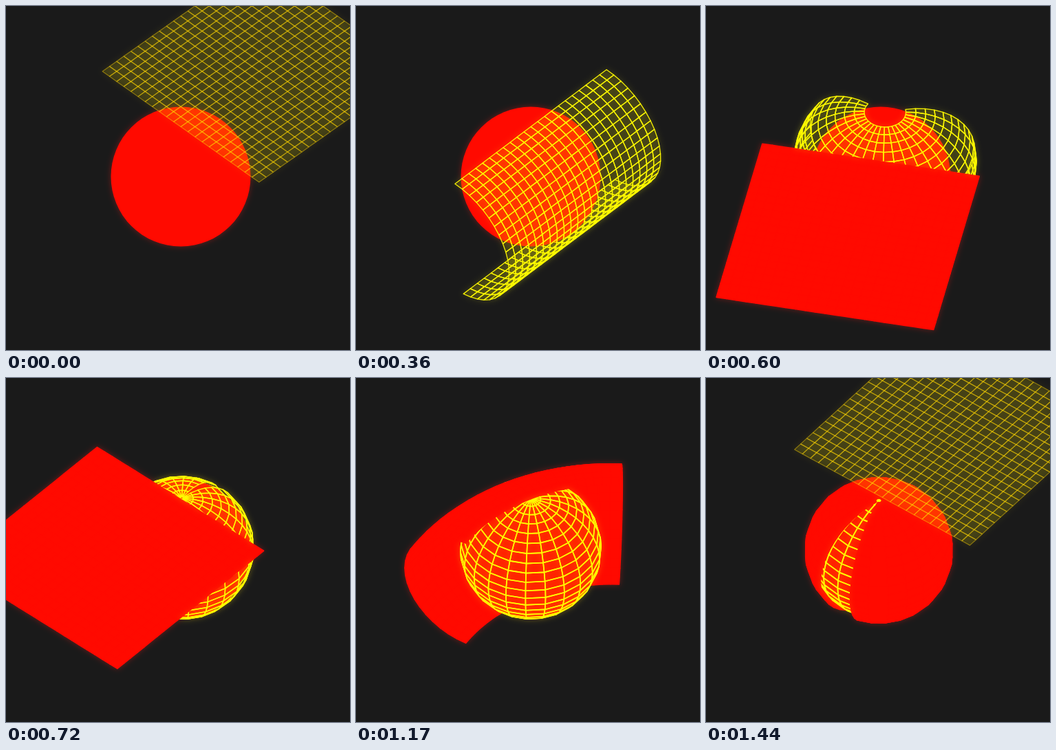
An HTML page with a canvas for the animation above (1.47 s loop, 500 by 500 pixels).

```html
<!DOCTYPE html>
<html lang="en">
<head>
<meta charset="utf-8">
<title>Wrapping sheets</title>
<style>
  html, body { margin: 0; width: 100%; height: 100%; overflow: hidden; background: #1a1a1a; }
  canvas { display: block; width: 500px; height: 500px; }
</style>
</head>
<body>
<canvas id="stage" width="500" height="500"></canvas>
<script>
const PERIOD = 1470, STEP = 30, HALF = PERIOD / 2;
const R = 102.5, SIDE = Math.PI * R, CELLS = 22;
const CX = 254, CY = 248, TILT = Math.SQRT1_2;
const RED = '#ff0800', BACK = '#1a1a1a';

const ctx = document.getElementById('stage').getContext('2d');
const layer = document.createElement('canvas');
layer.width = layer.height = 500;
const pen = layer.getContext('2d');
pen.lineJoin = 'round';

const clamp = (x, lo = 0, hi = 1) => Math.min(hi, Math.max(lo, x));

// A square slides in over the pole, rolls into a half tube, then closes into a sphere.
function sheetPoints(age, delay, turn) {
  const roll = Math.PI * clamp((age - delay) / 360, 1e-4);
  const wrap = Math.PI * clamp((age - 372) / 363, 1e-4);
  const slide = age < 0 ? 250 * (age / 255) ** 2 : 0;
  const rollRadius = SIDE / roll;
  const ring = SIDE / (2 * wrap) - R / 2;
  const sin = Math.sin(turn), cos = Math.cos(turn);
  const rows = [];
  for (let j = 0; j <= CELLS; j++) {
    const bend = roll * j / CELLS;
    const reach = ring + rollRadius * Math.sin(bend);
    const z = R - rollRadius * (1 - Math.cos(bend));
    const row = [];
    for (let i = 0; i <= CELLS; i++) {
      const a = wrap * (2 * i / CELLS - 1);
      const out = reach * Math.cos(a) - ring + slide;
      const side = reach * Math.sin(a);
      const front = out * cos - side * sin;
      row.push({
        x: CX + out * sin + side * cos,
        y: CY + (front - z) * TILT,
        depth: front + z
      });
    }
    rows.push(row);
  }
  return rows;
}

// Outer shells enclose inner ones: drawn first behind the core, last in front of it.
function addSheet(items, shell, age, delay, turn, paint) {
  const rows = sheetPoints(age, delay, turn);
  for (let j = 0; j < CELLS; j++) {
    for (let i = 0; i < CELLS; i++) {
      const quad = [rows[j][i], rows[j][i + 1], rows[j + 1][i + 1], rows[j + 1][i]];
      const depth = quad.reduce((sum, p) => sum + p.depth, 0) / 4;
      const order = depth + Math.sign(depth) * shell * 2000;
      items.push({ order, draw: () => { trace(quad); paint(); } });
    }
  }
}

function trace(quad) {
  pen.beginPath();
  for (const p of quad) pen.lineTo(p.x, p.y);
  pen.closePath();
}

function paintRed() {
  pen.fillStyle = pen.strokeStyle = RED;
  pen.lineWidth = 2;
  pen.fill();
  pen.stroke();
}

function yellowPaint(age) {
  const fade = clamp((age + 255) / 90);
  const glow = clamp(age / 240);
  const old = clamp(age / PERIOD);
  return () => {
    pen.fillStyle = `rgba(255,240,0,${fade * (0.12 - 0.08 * old)})`;
    pen.strokeStyle = `rgba(255,${210 + 40 * glow},0,${fade * (0.45 + 0.5 * glow)})`;
    pen.lineWidth = 1.2 + 0.5 * old;
    pen.fill();
    pen.stroke();
  };
}

function drawCore() {
  pen.beginPath();
  pen.arc(CX, CY, 101.5, 0, 2 * Math.PI);
  pen.fillStyle = RED;
  pen.fill();
}

function render(t) {
  const turn = Math.PI * (0.75 - 2 * t / PERIOD);
  const items = [{ order: 0, draw: drawCore }];
  const redAge = t - HALF, nextAge = t - PERIOD;
  addSheet(items, 1, t, 18, turn, yellowPaint(t));
  if (redAge > -400) addSheet(items, 2, redAge, 0, turn, paintRed);
  if (nextAge > -255) addSheet(items, 3, nextAge, 18, turn, yellowPaint(nextAge));

  pen.clearRect(0, 0, 500, 500);
  items.sort((a, b) => a.order - b.order).forEach(item => item.draw());

  ctx.fillStyle = BACK;
  ctx.fillRect(0, 0, 500, 500);
  ctx.drawImage(layer, 0, 0);
  ctx.save();
  ctx.globalCompositeOperation = 'screen';
  ctx.globalAlpha = 0.35;
  ctx.filter = 'blur(4px)';
  ctx.drawImage(layer, 0, 0);
  ctx.restore();
}

let start = null, shown = -1;
function frame(now) {
  if (start === null) start = now;
  const t = Math.floor((now - start) % PERIOD / STEP) * STEP;
  if (t !== shown) render(shown = t);
  requestAnimationFrame(frame);
}
requestAnimationFrame(frame);
</script>
</body>
</html>
```
